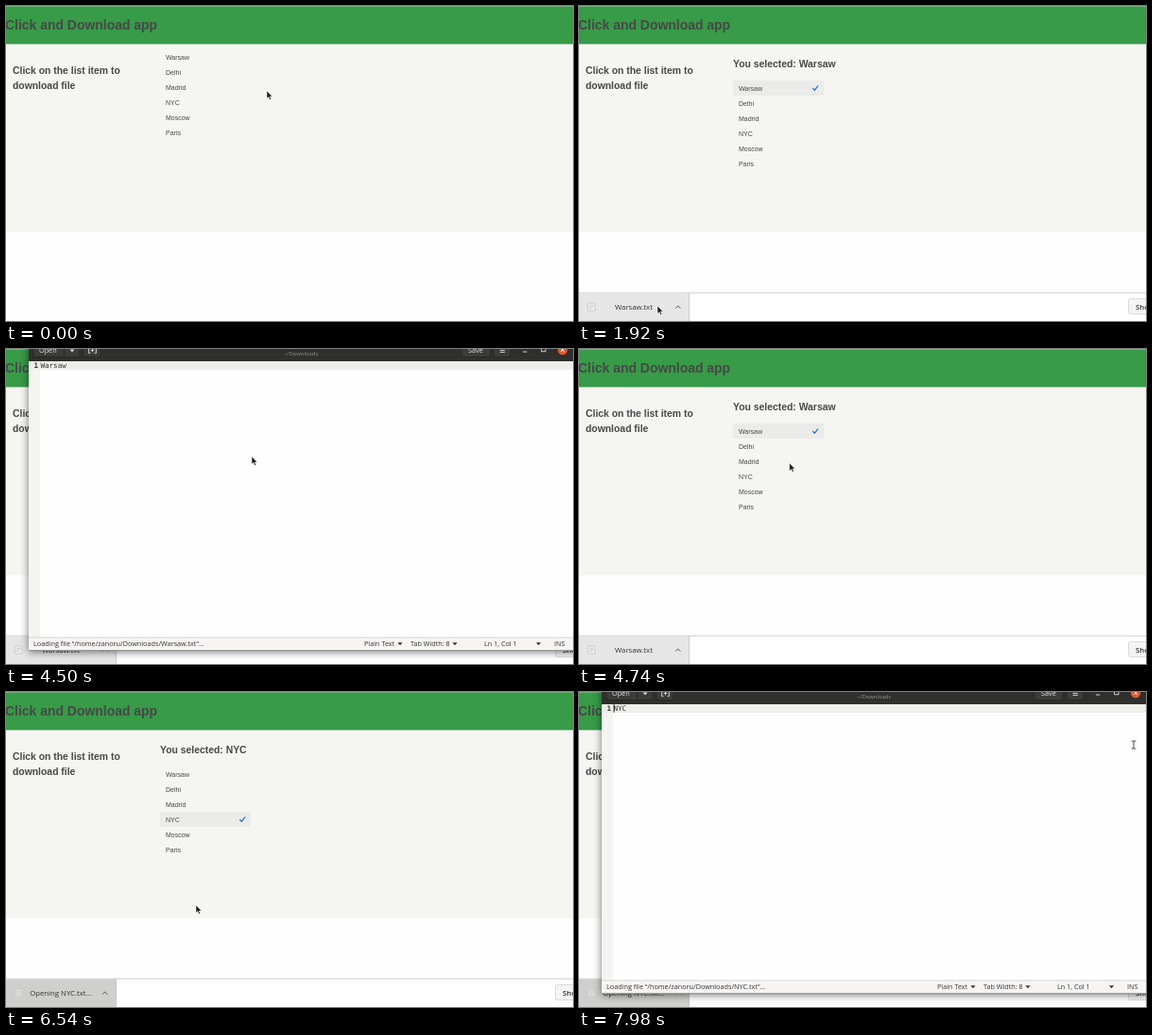
These frames come from a looping animation (600 by 334 pixels, 8 s). An HTML page:

```html
<!DOCTYPE html>
<html lang="en">
<head>
<meta charset="utf-8">
<title>Click and Download</title>
<style>
  html, body { margin: 0; width: 100%; height: 100%; overflow: hidden; background: #fefefe; }
  svg { display: block; width: 600px; height: 334px; overflow: hidden; }
  text { white-space: pre; }
  .page { font-family: "Liberation Sans", Arial, sans-serif; fill: #484848; }
  .title { font-size: 13.95px; font-weight: bold; }
  .head { font-size: 10.4px; font-weight: bold; }
  .list { font-size: 7px; }
  .ui { font-family: "Open Sans", "Noto Sans", sans-serif; font-size: 7.25px; fill: #333; }
  .shelf { font-size: 7.75px; }
  .bar { fill: #e4e4e0; }
  .mono { font-family: "DejaVu Sans Mono", monospace; font-size: 7.6px; fill: #333; }
  .line { fill: none; stroke-linecap: round; stroke-linejoin: round; }
  #win { filter: drop-shadow(0 1px 4px rgba(0, 0, 0, .55)); transform-box: view-box; transform-origin: 312px 160px; }
</style>
</head>
<body>
<svg viewBox="0 0 600 334" width="600" height="334">
  <defs>
    <clipPath id="itemClip"><rect id="itemMask" y="300" width="117" height="40"/></clipPath>
  </defs>

  <g class="page">
    <rect width="600" height="334" fill="#fefefe"/>
    <rect width="600" height="240" fill="#f5f5f2"/>
    <rect width="600" height="40.4" fill="#379b47"/>
    <rect width="600" height=".7" fill="#8fb596"/>
    <text class="title" x="-1" y="25">Click and Download app</text>
    <text class="head" x="7" y="72.4">Click on the list item to</text>
    <text class="head" x="7" y="88">download file</text>
    <text class="head" id="chosen" x="163" y="64.6"></text>
    <g id="list">
      <g id="mark">
        <rect x="163" y="46" width="96" height="16" fill="#ebebea"/>
        <path class="line" d="M247.6 54.4l1.7 1.9 3.4-4.4" stroke="#2272c3" stroke-width="1.2"/>
      </g>
    </g>
  </g>

  <g id="arrow" fill="#8dbde6">
    <path d="M14.2 -19h5.6v6h3.4l-6.2 6.4 -6.2 -6.4h3.4z"/>
    <rect x="9.5" y="-2.6" width="15" height="2" fill="#5f9fd8"/>
  </g>

  <g class="ui shelf">
    <g id="shelf">
      <rect y="304" width="600" height="32" fill="#fff"/>
      <rect y="303.6" width="600" height="1" fill="#cbcbcb"/>
      <g clip-path="url(#itemClip)">
        <rect id="itemBack" y="304.5" height="30"/>
        <g id="icon">
          <rect x="9.3" y="315" width="7.6" height="8" rx=".8" fill="#f1f1f1" stroke="#bdbdbd" stroke-width=".7"/>
          <path d="M10.8 317.3h4.6M10.8 319h4.6M10.8 320.7h3" stroke="#b5b5b5" stroke-width=".6"/>
        </g>
        <path id="ring" class="line" d="M3.5 322.5q2 -1.5 4 -.6A6 6 0 1 1 9 323.6q-2.5 -1.4 -4.5 .6" stroke="#2669b8" stroke-width="1.2"/>
        <text id="label" y="321.8" text-anchor="middle"></text>
        <path id="chevron" class="line" d="M-2.3 320.3l2.3 -2.4 2.3 2.4" stroke="#555" stroke-width="1"/>
        <rect id="itemEdge" y="304.5" width=".8" height="30" fill="#c6c6c6"/>
      </g>
    </g>
    <g id="show">
      <rect x="581.5" y="310.5" width="40" height="16" rx="2" fill="#f4f4f4" stroke="#d2d2d2" stroke-width=".8"/>
      <text x="589" y="321.7" font-weight="600">Show all</text>
    </g>
  </g>

  <g id="win">
    <rect x="24" y="-12" width="590" height="332" fill="#fefefe"/>
    <rect x="24" y="-12" width="590" height="25" fill="#2f2f2d"/>
    <g fill="#3b3b38" stroke="#222" stroke-width=".6">
      <rect x="29" y="-10" width="49" height="18.5" rx="2"/>
      <rect x="82" y="-10" width="18" height="18.5" rx="2"/>
      <rect x="482" y="-10" width="30" height="18.5" rx="2"/>
      <rect x="516" y="-10" width="18" height="18.5" rx="2"/>
    </g>
    <path d="M61.5 -10v18.5" stroke="#222" stroke-width=".7"/>
    <g class="ui">
      <text class="bar" x="35" y="3.7">Open</text>
      <text class="bar" x="489" y="3.7">Save</text>
      <text x="294" y="7.4" style="font-size:5.9px;fill:#92928e">~/Downloads</text>
    </g>
    <path d="M67.5 .4h5l-2.5 2.8z" fill="#e4e4e0"/>
    <path class="line" d="M89 -2h-1.4v6.4h1.4M94 -2h1.4v6.4h-1.4M90 1.4h3M91.5 -.1v3M523 -.6h4.4M523 1.4h4.4M523 3.4h4.4M547.3 3h3.6M567 -1.5h4v4.2h-4z" stroke="#dededa" stroke-width=".9"/>
    <circle cx="589" cy="1" r="5.2" fill="#e5562b"/>
    <path class="line" d="M587.2 -.8l3.6 3.6M590.8 -.8l-3.6 3.6" stroke="#fff" stroke-width=".9"/>
    <rect x="24" y="13" width="12" height="293" fill="#f4f4f1"/>
    <rect x="24" y="13" width="590" height="9" fill="#eeeeea"/>
    <text class="mono" x="29.5" y="20.4" font-weight="bold">1</text>
    <text class="mono" id="body" x="36.4" y="20.4"></text>
    <rect id="caret" x="36.6" y="13.2" width=".9" height="8.4" fill="#111"/>
    <rect x="24" y="306" width="590" height="14" fill="#f6f5f3"/>
    <rect x="24" y="305.5" width="590" height=".8" fill="#cfcdc9"/>
    <rect x="24" y="319.3" width="590" height=".8" fill="#77756f"/>
    <g class="ui">
      <text id="status" x="29" y="315.4"></text>
      <text x="379" y="315.4">Plain Text</text>
      <text x="428" y="315.4">Tab Width: 8</text>
      <text x="506" y="315.4">Ln 1, Col 1</text>
      <text x="580" y="315.4">INS</text>
    </g>
    <path d="M414.4 311.3h5.2l-2.6 3zM472.4 311.3h5.2l-2.6 3zM560.9 311.3h5.2l-2.6 3z" fill="#3a3a3a"/>
  </g>

  <path id="pointer" d="M0 0V8.2L1.9 6.5 3.2 9.4 4.6 8.8 3.3 6H5.9Z" fill="#1c1c1c" stroke="#fff" stroke-width=".5"/>
  <path id="beam" class="line" d="M-2 -4h1.3L0 -3.4 .7 -4H2M0 -3.4V3.4M-2 4h1.3L0 3.4 .7 4H2" stroke="#333" stroke-width=".9"/>
</svg>

<script>
const LOOP = 8000, STEP = 60;
const $ = id => document.getElementById(id);
const cities = ['Warsaw', 'Delhi', 'Madrid', 'NYC', 'Moscow', 'Paris'];

// time, x, y
const path = [
  [0, 276, 90], [300, 171, 70], [420, 171, 70], [720, 182, 54], [1260, 182, 54],
  [1740, 79, 316], [1920, 83, 318], [2700, 83, 318], [3240, 214, 157], [3480, 262, 118],
  [3900, 420, 62], [4260, 589, 2], [4380, 589, 2], [4500, 260, 114], [5040, 176, 130],
  [5640, 176, 130], [6120, 84, 318], [6300, 85, 319], [6540, 201, 226], [6600, 201, 226],
  [6960, 266, 110], [7800, 584, 102], [7980, 587, 56]
];
const beamTimes = [[3120, 3420], [3540, 4140], [7560, LOOP]];

const downloads = [
  { city: 'Warsaw', click: 960, hover: 1620, open: 2040, opened: 3960, win: 3420, close: 4560, hide: 4800, wide: 128, back: '#e6e6e6' },
  { city: 'NYC', click: 5340, hover: 6000, open: 6300, opened: 9000, win: 7500, close: 9000, hide: 9000, wide: 117, back: '#cfcfce' }
];
const shelfRise = [[60, 0], [120, 14], [180, 23.5], [240, 30]];
const itemGrow = [[120, 0], [180, 18], [240, 52], [300, 88], [360, 117]];

cities.forEach((name, i) => {
  const label = document.createElementNS('http://www.w3.org/2000/svg', 'text');
  label.textContent = name;
  label.setAttribute('class', 'list');
  label.setAttribute('x', 169);
  label.setAttribute('y', 56.6 + i * 16);
  $('list').append(label);
});

const clamp = v => Math.min(1, Math.max(0, v));
const within = (t, [from, to]) => t >= from && t < to;
const show = (id, on) => $(id).setAttribute('visibility', on ? 'visible' : 'hidden');
const move = (id, x, y) => $(id).setAttribute('transform', `translate(${x} ${y})`);
const set = (id, name, value) => $(id).setAttribute(name, value);

function at(keys, t, column = 1) {
  const next = keys.findIndex(key => key[0] > t);
  if (next === 0) return keys[0][column];
  if (next < 0) return keys[keys.length - 1][column];
  const a = keys[next - 1], b = keys[next];
  return a[column] + (b[column] - a[column]) * (t - a[0]) / (b[0] - a[0]);
}

function drawPage(d, active) {
  move('list', 0, active ? 33 : 0);
  show('mark', active);
  move('mark', 0, cities.indexOf(d.city) * 16);
  $('chosen').textContent = active ? `You selected: ${d.city}` : '';
}

function drawShelf(d, t) {
  const u = t - d.click;
  const height = at(shelfRise, u) * (1 - clamp((t - d.hide) / 180));
  const opening = within(t, [d.open, d.opened]);
  const full = opening ? d.wide : 117;
  const width = u < 360 ? at(itemGrow, u) : full;
  show('shelf', height > 0);
  show('show', height > 0);
  move('shelf', 0, 30 - height);
  move('show', 0, (30 - height) / 2);
  set('itemMask', 'width', width);
  set('itemBack', 'width', width);
  set('itemBack', 'fill', t < d.hover ? '#fff' : opening ? d.back : '#e6e6e6');
  set('itemEdge', 'x', width - .8);
  set('icon', 'opacity', opening ? .45 : 1);
  set('ring', 'opacity', clamp((780 - u) / 420));
  $('label').textContent = opening ? `Opening ${d.city}.txt...` : `${d.city}.txt`;
  set('label', 'x', (full - 1) / 2);
  move('chevron', full - 12.3, 0);

  const p = clamp((u - 60) / 600);
  set('arrow', 'opacity', 4 * p * (1 - p));
  move('arrow', 0, 334 - height - 20 * (1 - p));
}

function drawWindow(d, t) {
  const open = within(t, [d.win, d.close + 120]);
  const p = Math.min(clamp((t - d.win + 60) / 180), 1 - clamp((t - d.close) / 120));
  show('win', open);
  $('win').style.opacity = p;
  $('win').style.transform = `scale(${.9 + .1 * p})`;
  $('body').textContent = d.city;
  $('status').textContent = `Loading file “/home/zanoru/Downloads/${d.city}.txt”…`;
  set('caret', 'opacity', (t - d.win) % 1200 < 600 ? 1 : 0);
}

function drawCursor(t) {
  const beam = beamTimes.some(span => within(t, span));
  const x = at(path, t, 1), y = at(path, t, 2);
  show('pointer', !beam);
  show('beam', beam);
  move('pointer', x, y);
  move('beam', x, y);
}

function draw(now) {
  const t = Math.floor(now % LOOP / STEP) * STEP;
  const d = downloads[t < downloads[1].click ? 0 : 1];
  drawPage(d, t >= d.click);
  drawShelf(d, t);
  drawWindow(d, t);
  drawCursor(t);
}

const start = performance.now();
function tick() {
  draw(performance.now() - start);
  requestAnimationFrame(tick);
}
tick();
</script>
</body>
</html>
```
